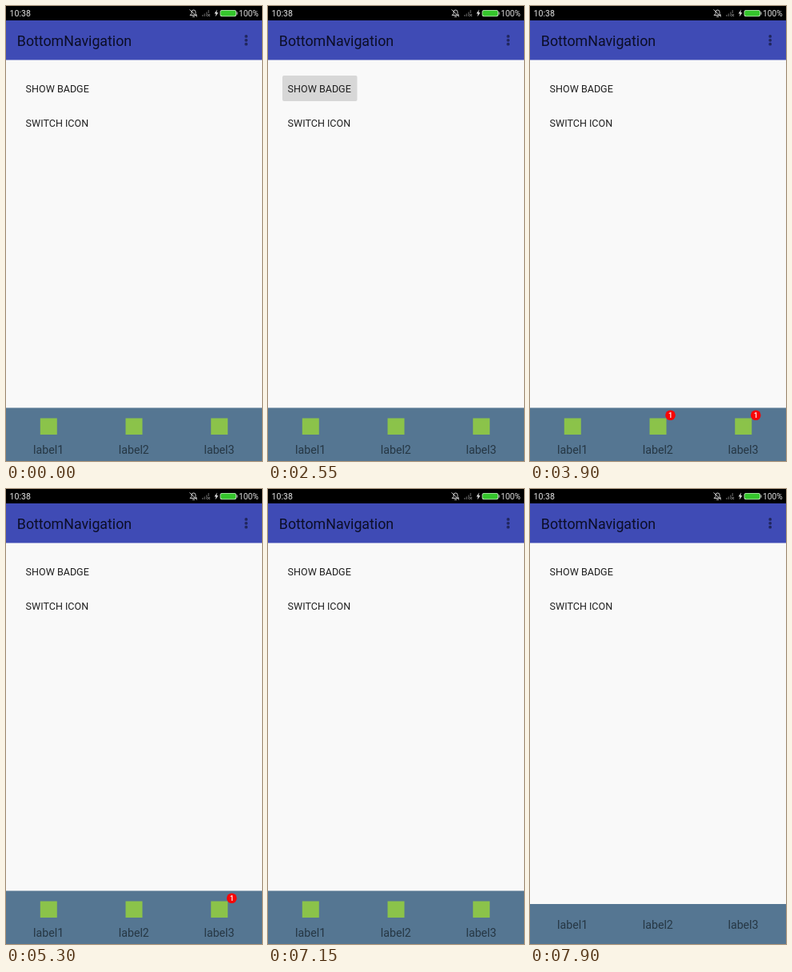
Animation of 320 by 569 pixels, one loop 8 s. Source, as an HTML page with a canvas:

```html
<!DOCTYPE html>
<html lang="en">
<head>
<meta charset="utf-8">
<title>Bottom navigation demo</title>
<style>
html, body { margin: 0; width: 100%; height: 100%; overflow: hidden; background: #f9f9f9; }
canvas { display: block; width: 320px; height: 569px; }
</style>
</head>
<body>
<canvas id="stage"></canvas>
<script>
const W = 320, H = 569, LOOP = 8000, STEP = 50;
const canvas = document.getElementById('stage');
const ctx = canvas.getContext('2d');
const ratio = window.devicePixelRatio || 1;
canvas.width = Math.round(W * ratio);
canvas.height = Math.round(H * ratio);
ctx.scale(ratio, ratio);

const tabs = [
  { x: 53.3, label: 'label1', hide: [3600, 3900] },
  { x: 160, label: 'label2', hide: [5050, 5300] },
  { x: 266.7, label: 'label3', hide: [5850, 6100] }
];
const buttons = [
  { y: 87, label: 'SHOW BADGE', press: [2550, 2600] },
  { y: 129.7, label: 'SWITCH ICON', press: [7850, 7900] }
];
const SHOW = [2550, 2850], COLLAPSE = 7900;

// Accelerate-decelerate progress between two times
function ease(t, [from, to]) {
  const p = Math.min(1, Math.max(0, (t - from) / (to - from)));
  return (1 - Math.cos(Math.PI * p)) / 2;
}

function rect(x, y, w, h, color, radius = 0) {
  ctx.fillStyle = color;
  ctx.beginPath();
  ctx.roundRect(x, y, w, h, radius);
  ctx.fill();
}

function disc(x, y, r, color) {
  ctx.fillStyle = color;
  ctx.beginPath();
  ctx.arc(x, y, r, 0, 2 * Math.PI);
  ctx.fill();
}

function shape(path, color, stroke) {
  const p = new Path2D(path);
  if (stroke) {
    ctx.strokeStyle = color;
    ctx.lineWidth = stroke;
    ctx.stroke(p);
  } else {
    ctx.fillStyle = color;
    ctx.fill(p);
  }
}

function text(str, x, y, size, color, align = 'left', weight = 400) {
  ctx.font = `${weight} ${size}px Roboto, sans-serif`;
  ctx.textAlign = align;
  ctx.fillStyle = color;
  ctx.fillText(str, x, y);
}

function statusBar() {
  rect(0, 0, W, 18, '#000');
  text('10:38', 4.5, 13, 10.6, '#e2e2e2');
  text('100%', 291, 13, 10.2, '#e2e2e2');
  // Muted bell
  shape('M230 11.5 L232 9.5 V7.5 Q232 5 234.5 5 Q237 5 237 7.5 V9.5 L238.5 11.5 Z M233 13.3 H236 M229.5 4.5 L239 13.5', '#d0d0d0', 1);
  // No signal
  shape('M245 13 V11 H246.5 V13 Z M247.5 13 V9.5 H249 V13 Z M250 13 V7.5 H251.5 V13 Z M252.5 9 V5 H254 V9 Z', '#4a4a4a');
  shape('M252 10 L255 13 M255 10 L252 13', '#a8a8a8', 0.9);
  // Charging
  shape('M264 4.5 L260.5 9.5 H262.6 L261.6 13.5 L265.4 8.3 H263.2 Z', '#e8e8e8');
  rect(267.5, 5, 20.5, 8.2, '#c5e8c2', 2.5);
  rect(268.3, 5.8, 18.9, 6.6, '#35c52c', 1.8);
  rect(288.4, 7.5, 1.2, 3.2, '#b5b5b5');
}

function header() {
  rect(0, 18, W, 49.5, '#3f4bb5');
  text('BottomNavigation', 13.8, 49.5, 17.8, '#0c0e27');
  for (const y of [37.9, 42.8, 47.7]) disc(300.2, y, 1.9, '#20265c');
}

function drawButton(b, t) {
  if (t >= b.press[0] && t < b.press[1]) rect(18, b.y, 93.5, 32, '#d7d7d7', 2);
  text(b.label, 24.6, b.y + 21, 12.55, '#202020');
}

function bar(t) {
  const small = t >= COLLAPSE;
  const top = small ? 519 : 502.5;
  rect(0, top, W, H - top, '#557692');
  for (const tab of tabs) {
    text(tab.label, tab.x - 0.2, small ? 549.5 : 560, 14.2, '#263744', 'center');
    if (small) continue;
    rect(tab.x - 10.5, 515.5, 21, 20.5, '#8bc34a');
    const size = ease(t, SHOW) - ease(t, tab.hide);
    if (size > 0.01) badge(tab.x + 15.5, 511.7, size);
  }
}

function badge(x, y, size) {
  ctx.save();
  ctx.translate(x, y);
  ctx.scale(size, size);
  disc(0, 0, 6.3, '#f80505');
  text('1', 0, 3.2, 9, '#fff', 'center', 500);
  ctx.restore();
}

function draw(now) {
  const t = Math.floor((now % LOOP) / STEP) * STEP;
  rect(0, 0, W, H, '#f9f9f9');
  statusBar();
  header();
  for (const b of buttons) drawButton(b, t);
  bar(t);
  requestAnimationFrame(draw);
}
draw(0);
</script>
</body>
</html>
```
